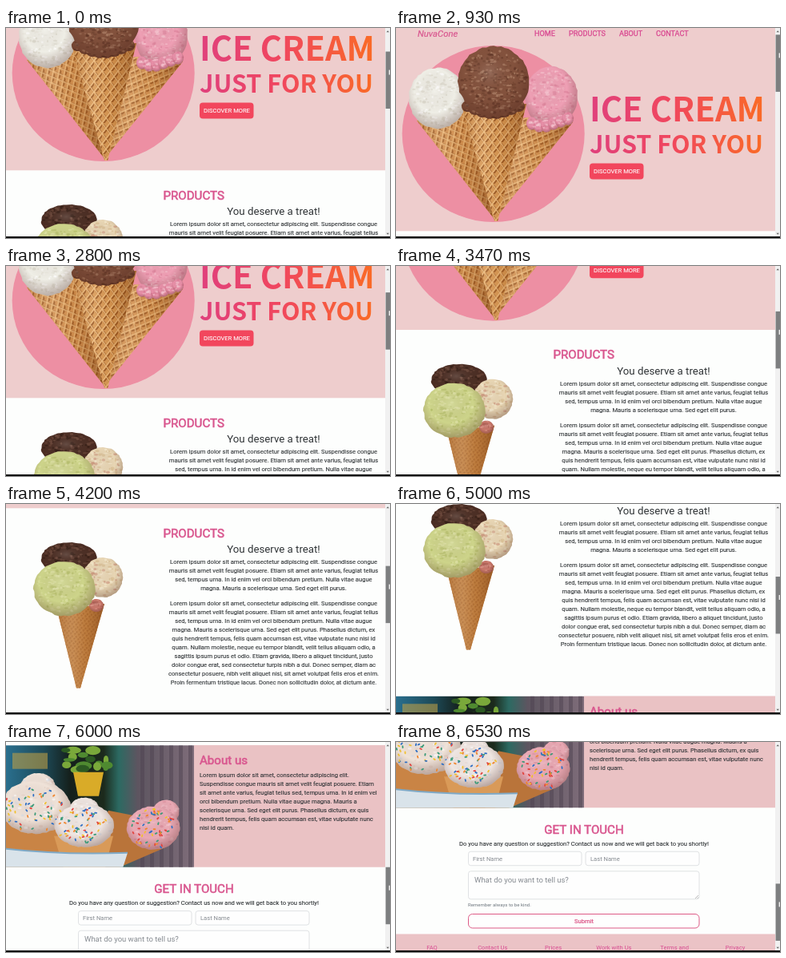
Animation, 480 px wide and 263 px high, one loop 6590 ms. Source, as an HTML page:

```html
<!DOCTYPE html>
<html lang="en">
<head>
<meta charset="utf-8">
<title>Ice cream shop page</title>
<style>
  html, body { margin: 0; width: 100%; height: 100%; overflow: hidden; background: #fdfefd; }
  svg { display: block; width: 100%; height: 100%; font-family: Roboto, sans-serif; }
</style>
</head>
<body>
<svg id="stage" viewBox="0 0 480 263"></svg>
<script>
const LOOP = 6590, FPS = 15;
const INK = '#2f3336', PINK = '#d9578f', GREY = '#858a90';

let seed = 11;
const rnd = () => (seed = seed * 16807 % 2147483647) / 2147483647;
const pick = list => list[Math.floor(rnd() * list.length)];
const repeat = (n, make) => Array.from({ length: n }, (_, i) => make(i)).join('');

const text = (x, y, size, str, fill = INK, more = '') =>
  `<text x="${x}" y="${y}" font-size="${size}" fill="${fill}" ${more}>${str}</text>`;
const mid = 'text-anchor="middle"';
const outline = (color, width) => `stroke="${color}" stroke-width="${width}"`;
const heading = (x, y, str, more = '') =>
  text(x, y, 15.1, str, PINK, `${outline(PINK, 0.6)} ${more}`);
const lines = (x, y, list, more = '') =>
  list.map((str, i) => text(x, y + i * 11, 7.6, str, INK, `${outline(INK, 0.12)} ${more}`)).join('');
const rect = (x, y, w, h, fill, more = '') =>
  `<rect x="${x}" y="${y}" width="${w}" height="${h}" fill="${fill}" ${more}/>`;
const oval = (x, y, rx, ry, fill, more = '') =>
  `<ellipse cx="${x}" cy="${y}" rx="${rx}" ry="${ry}" fill="${fill}" ${more}/>`;
const poly = (points, fill) => `<polygon points="${points}" fill="${fill}"/>`;
const box = (x, y, w, h) => rect(x, y, w, h, '#fefefe', `rx="3" ${outline('#d8dbde', 0.8)}`);

// Rough-edged scoop with speckles and a shaded rim
function scoop(x, y, rx, ry, base, tones, count) {
  const edge = repeat(60, i => {
    const a = i / 60 * 2 * Math.PI, k = 0.98 + rnd() * 0.04;
    return `${(x + Math.cos(a) * rx * k).toFixed(1)},${(y + Math.sin(a) * ry * k).toFixed(1)} `;
  });
  const specks = repeat(count, () => {
    const a = rnd() * 2 * Math.PI, r = Math.sqrt(rnd()) * 0.92;
    return oval(x + Math.cos(a) * rx * r, y + Math.sin(a) * ry * r,
      0.8 + rnd() * 2, 0.6 + rnd() * 1.2, pick(tones), 'opacity=".6"');
  });
  return poly(edge, base) + specks + poly(edge, 'url(#rim)');
}

const cone = (points, base, pattern) =>
  poly(points, base) + poly(points, `url(#${pattern})`) + poly(points, 'url(#side)');

const waffle = (id, turn, w, h, dark, light) =>
  `<pattern id="${id}" width="${w}" height="${h}" patternUnits="userSpaceOnUse" patternTransform="rotate(${turn})">
    <path d="M0 0L${w} ${h}M${w} 0L0 ${h}" transform="translate(1.4 1.4)" ${outline(dark, 2)}/>
    <path d="M0 0L${w} ${h}M${w} 0L0 ${h}" ${outline(light, 1.3)}/></pattern>`;

const gradient = (id, stops, more = '') =>
  `<linearGradient id="${id}" ${more}>${stops.map(([at, color, alpha = 1]) =>
    `<stop offset="${at}" stop-color="${color}" stop-opacity="${alpha}"/>`).join('')}</linearGradient>`;

const defs = `<defs>
  ${gradient('sunset', [[0, '#e0407c'], [.45, '#f0465f'], [1, '#fa6b26']],
    'gradientUnits="userSpaceOnUse" x1="243" y1="0" x2="460" y2="0"')}
  ${gradient('side', [[0, '#8a4a18', .25], [.35, '#fff', .1], [.6, '#8a4a18', .1], [1, '#6a300a', .5]])}
  ${gradient('room', [[0, '#2a6f8e'], [.2, '#1d4a58'], [.34, '#15201c'], [.52, '#1c2a1c'],
    [.6, '#2c6a62'], [.7, '#5d5560'], [1, '#7f6d7a']])}
  <radialGradient id="rim" cx=".45" cy=".38" r=".64">
    <stop offset="0" stop-color="#fff" stop-opacity=".14"/>
    <stop offset=".55" stop-color="#401810" stop-opacity="0"/>
    <stop offset="1" stop-color="#401810" stop-opacity=".32"/>
  </radialGradient>
  ${waffle('mesh', 0, 10, 13, '#9c5a24', '#edbb7c')}
  ${waffle('meshL', -28, 9, 11, '#9c5a24', '#edbb7c')}
  ${waffle('meshR', 28, 9, 11, '#9c5a24', '#edbb7c')}
  ${waffle('fine', 8, 5, 6, '#a9682f', '#c58444')}
  <clipPath id="photo"><rect y="4.5" width="235" height="152.5"/></clipPath>
</defs>`;

function hero() {
  const nav = [[173, 'HOME'], [216, 'PRODUCTS'], [279, 'ABOUT'], [325, 'CONTACT']];
  const bold = 'font-family="Noto Sans CJK JP, Noto Sans CJK SC, Noto Sans, sans-serif" font-weight="700"';
  return rect(0, 0, 474, 254.3, '#eecdcd') +
    oval(121.7, 132.5, 114, 110.5, '#ed8fa3') +
    cone('26,116 88,104 124,200 122,238', '#d39150', 'meshL') +
    cone('160,112 221,118 128,234 122,200', '#d39150', 'meshR') +
    scoop(52, 88, 36, 38, '#efeee6', ['#fff', '#d8d5c8', '#e6e4da'], 190) +
    scoop(194, 86, 33, 38, '#ee9fb4', ['#f8c9d4', '#dc8099', '#f3b4c3'], 190) +
    repeat(6, i => scoop(170 + i * 9, 124 - Math.abs(i - 1.5) * 3, 7, 8, '#e88fa8', ['#f8c9d4', '#d97891'], 12)) +
    cone('83,100 163,95 127,242 123,242', '#d79752', 'mesh') +
    repeat(8, i => scoop(90 + i * 9, 98 + Math.sin(i / 7 * Math.PI) * 9, 8, 7, '#744532', ['#9a6a52', '#593222'], 12)) +
    scoop(122, 66.5, 44.5, 43.5, '#83523d', ['#a97a60', '#5f3626', '#b58a70', '#6e422f'], 300) +
    text(27, 11, 11.3, 'NuvaCone', PINK, `font-style="italic" ${outline(PINK, 0.2)}`) +
    nav.map(([x, str]) => text(x, 10.4, 9.1, str, '#d8458f', outline('#d8458f', 0.25))).join('') +
    text(242, 117, 41.5, 'ICE CREAM', 'url(#sunset)', bold) +
    text(242, 157.4, 30.6, 'JUST FOR YOU', 'url(#sunset)', bold) +
    rect(242, 169.5, 67.5, 20, '#f2465d', 'rx="4"') +
    text(247, 182.3, 7.56, 'DISCOVER MORE', '#fff', outline('#fff', 0.1));
}

function products() {
  return cone('64,382 123,374 93,479.5 88,479.5', '#b97636', 'fine') +
    scoop(113, 376, 9, 8, '#c8776a', ['#dd9a8c', '#a9584c'], 14) +
    scoop(79, 317, 35, 20, '#4c2f25', ['#6b4638', '#2f1a13', '#7a5546'], 110) +
    scoop(121, 341, 25, 25, '#e8d6b4', ['#f7ecd4', '#d3b88a', '#c98f78'], 100) +
    scoop(73, 355, 38.5, 34, '#cdd48a', ['#e2e6ae', '#b3bd68', '#dbe09c'], 190) +
    heading(196.5, 290.8, 'PRODUCTS') +
    text(334.5, 309.9, 13.26, 'You deserve a treat!', INK, mid) +
    lines(334.5, 324.3, [
      'Lorem ipsum dolor sit amet, consectetur adipiscing elit. Suspendisse congue',
      'mauris sit amet velit feugiat posuere. Etiam sit amet ante varius, feugiat tellus',
      'sed, tempus urna. In id enim vel orci bibendum pretium. Nulla vitae augue',
      'magna. Mauris a scelerisque urna. Sed eget elit purus.'], mid) +
    lines(334.5, 376.3, [
      'Lorem ipsum dolor sit amet, consectetur adipiscing elit. Suspendisse congue',
      'mauris sit amet velit feugiat posuere. Etiam sit amet ante varius, feugiat tellus',
      'sed, tempus urna. In id enim vel orci bibendum pretium. Nulla vitae augue',
      'magna. Mauris a scelerisque urna. Sed eget elit purus. Phasellus dictum, ex',
      'quis hendrerit tempus, felis quam accumsan est, vitae vulputate nunc nisi id',
      'quam. Nullam molestie, neque eu tempor blandit, velit tellus aliquam odio, a',
      'sagittis ipsum purus et odio. Etiam gravida, libero a aliquet tincidunt, justo',
      'dolor congue erat, sed consectetur turpis nibh a dui. Donec semper, diam ac',
      'consectetur posuere, nibh velit aliquet nisl, sit amet volutpat felis eros et enim.',
      'Proin fermentum tristique lacus. Donec non sollicitudin dolor, at dictum ante.'], mid);
}

// Soft-serve swirl: body, peak and sprinkles
function swirl(x, y, w, h, lean, color, tones) {
  const sprinkles = repeat(60, () => {
    const a = rnd() * 2 * Math.PI, r = Math.sqrt(rnd()) * 0.88;
    const sx = x + Math.cos(a) * r * w, sy = y + Math.sin(a) * r * h;
    return rect(sx, sy, 3.6, 1.8, pick(['#e2443f', '#2f6fc4', '#f0c030', '#3a9a78', '#f0862e']),
      `rx=".8" transform="rotate(${rnd() * 180} ${sx} ${sy})"`);
  });
  return scoop(x + lean, y - h * 0.75, w * 0.5, h * 0.55, color, tones, 20) +
    scoop(x, y, w, h, color, tones, 60) + sprinkles;
}

function about() {
  const cream = ['#fff', '#e6cfc4', '#d5dde6'];
  const photo = rect(0, 4, 235, 154, 'url(#room)') +
    repeat(6, i => rect(168 + i * 12, 4, 5, 154, '#4e4350', 'opacity=".5"')) +
    rect(8, 14, 44, 20, '#c9a544', 'opacity=".55"') +
    repeat(16, () => oval(70 + rnd() * 60, 8 + rnd() * 28, 3 + rnd() * 8, 2 + rnd() * 4, pick(['#4f8a30', '#2c5a22', '#7aa83a']))) +
    poly('84,38 122,38 116,68 90,68', '#d9ab28') +
    poly('0,88 80,96 112,158 0,158', '#c98445') +
    poly('128,86 158,92 200,132 140,158 92,158', '#b9743a') +
    poly('60,118 134,118 124,158 72,158', '#d99a58') +
    swirl(37, 82, 44, 33, 3, '#efe2d8', cream) +
    swirl(184, 108, 33, 27, 16, '#e9a9b4', ['#f6ccd2', '#d58697', '#f0bcc6']) +
    swirl(98, 105, 37, 27, 0, '#efe6e2', cream) +
    '<path d="M0 134Q70 142 152 139L146 158H0Z" fill="#d9e3ea"/>' +
    `<path d="M0 134Q70 142 152 139" fill="none" ${outline('#7fa9c6', 2)}/>`;
  return rect(235, 537.5, 239, 152.8, '#eac2c4') +
    `<g transform="translate(0 533.3)" clip-path="url(#photo)">${photo}</g>` +
    heading(242, 562, 'About us') +
    lines(242, 577.3, [
      'Lorem ipsum dolor sit amet, consectetur adipiscing elit.',
      'Suspendisse congue mauris sit amet velit feugiat posuere. Etiam',
      'sit amet ante varius, feugiat tellus sed, tempus urna. In id enim vel',
      'orci bibendum pretium. Nulla vitae augue magna. Mauris a',
      'scelerisque urna. Sed eget elit purus. Phasellus dictum, ex quis',
      'hendrerit tempus, felis quam accumsan est, vitae vulputate nunc',
      'nisi id quam.']);
}

function contact() {
  const links = ['FAQ', 'Contact Us', 'Prices', 'Work with Us', 'Terms and', 'Privacy'];
  return heading(235, 723, 'GET IN TOUCH', mid) +
    lines(235, 737.8, ['Do you have any question or suggestion? Contact us now and we will get back to you shortly!'], mid) +
    box(90.5, 745.2, 141.5, 17.5) + text(96, 756.6, 7.6, 'First Name', GREY) +
    box(237, 745.2, 142, 17.5) + text(243, 756.6, 7.6, 'Last Name', GREY) +
    box(90.5, 769.8, 288.5, 35) + text(98, 783.8, 9.46, 'What do you want to tell us?', GREY) +
    `<path d="M374 804L378 800M376.5 804L378 802.5" ${outline('#888', 0.6)}/>` +
    text(90, 813.6, 6.06, 'Remember always to be kind.', '#6c757d') +
    rect(90.5, 823.5, 288.5, 17.5, '#fefefe', `rx="5" ${outline('#dd5a86', 1)}`) +
    text(235, 834.8, 7.6, 'Submit', '#d9487f', `${mid} ${outline('#d9487f', 0.2)}`) +
    rect(0, 848.5, 474, 60, '#ebc3c6') +
    links.map((str, i) => text(45 + i * 75.8, 867.5, 7.6, str, '#d94f93', mid)).join('');
}

const stage = document.getElementById('stage');
stage.innerHTML = defs + rect(0, 0, 480, 263, '#fdfefd') +
  `<g id="page">${hero()}${products()}${about()}${contact()}</g>` +
  rect(474, 0, 6, 263, '#f1f1f1') +
  '<path d="M475.5 5.2L477.2 3.2L479 5.2ZM475.5 256.8L477.2 258.8L479 256.8Z" fill="#666"/>' +
  `<g id="thumb">${rect(474.6, 0, 5.4, 71.5, '#7d7f80')}${rect(478.6, 23, 1.4, 6, '#eee')}</g>` +
  rect(0, 261, 480, 2, '#111');
const page = document.getElementById('page'), thumb = document.getElementById('thumb');

// Scroll position over time: [ms, px]
const path = [[0, 76], [700, 0], [2000, 0], [2800, 89], [4050, 249], [4650, 249],
  [5000, 297], [6000, 533.6], [6530, 608]];

function scrollAt(t) {
  const i = path.findIndex(([time]) => time >= t);
  if (i < 0) return path[path.length - 1][1];
  if (i === 0) return path[0][1];
  const [t0, y0] = path[i - 1], [t1, y1] = path[i];
  return y0 + (y1 - y0) * (t - t0) / (t1 - t0);
}

function draw(now) {
  const step = Math.floor((now % LOOP + 4) * FPS / 1000);
  const y = scrollAt(step * 1000 / FPS);
  page.setAttribute('transform', `translate(0 ${-y})`);
  thumb.setAttribute('transform', `translate(0 ${8.4 + y * 0.278})`);
}

const start = performance.now();
function tick() {
  draw(performance.now() - start);
  requestAnimationFrame(tick);
}
tick();
</script>
</body>
</html>
```
